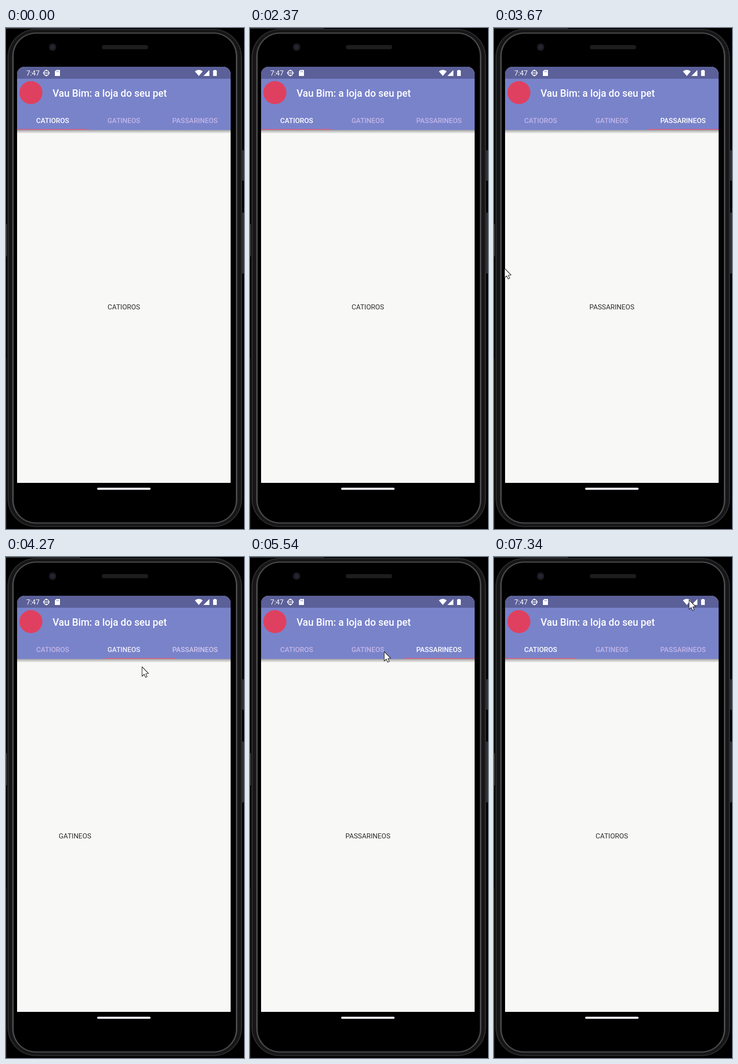
Recreate the animation shown at these times as an HTML page with a canvas. Size 516 by 1086 pixels, loop 7400 ms.

```html
<!DOCTYPE html>
<html lang="pt-BR">
<head>
<meta charset="utf-8">
<title>Tabs</title>
<style>
html, body { margin: 0; width: 100%; height: 100%; overflow: hidden; background: #000; }
canvas { display: block; width: 516px; height: 1086px; }
</style>
</head>
<body>
<canvas id="stage" width="516" height="1086"></canvas>
<script>
const ctx = document.getElementById('stage').getContext('2d');
const LOOP = 7400, SETTLE = 400, GLIDE = 330;
const LEFT = 24, TOP = 84, WIDTH = 463, HEIGHT = 902, TAB = WIDTH / 3;
const TABS = ['CATIOROS', 'GATINEOS', 'PASSARINEOS'];
const WHITE = '#fff', STATUS = '#5b6099', BAR = '#7983ca';

// The pointer glides to (x, y) by `at`; the pages begin to slide at `from`.
const ENTER = { at: 2430, x: 460, y: 521 };
const GESTURES = [
  { at: 2740, x: 110, y: 525, from: 2500, page: 1 },
  { at: 3200, x: 23, y: 521, from: 3135, page: 2 },
  { at: 4270, x: 295, y: 238, from: 3995, page: 1 },
  { at: 4830, x: 400, y: 203, from: 4830, page: 2 },
  { at: 5370, x: 291, y: 205, from: 5540, page: 1.016 },
  { at: 5900, x: 122, y: 188, from: 6240, page: 0 },
  { at: 7340, x: 423, y: 93, from: LOOP, page: 0 }
];

const clamp = v => Math.max(0, Math.min(1, v));
const mix = (a, b, u) => a + (b - a) * u;
const progress = (t, start, span) => {
  const u = clamp((t - start) / span);
  return u * u * (3 - 2 * u);
};

function pageAt(t) {
  return GESTURES.reduce((p, g) => mix(p, g.page, progress(t, g.from, SETTLE)), 0);
}

function pointerAt(t) {
  return GESTURES.reduce((p, g) => {
    const u = progress(t, g.at - GLIDE, GLIDE);
    return { x: mix(p.x, g.x, u), y: mix(p.y, g.y, u) };
  }, ENTER);
}

function rect(x, y, w, h, color) {
  ctx.fillStyle = color;
  ctx.fillRect(x, y, w, h);
}

function round(x, y, w, h, r, color) {
  ctx.beginPath();
  ctx.roundRect(x, y, w, h, r);
  ctx.fillStyle = color;
  ctx.fill();
}

function circle(x, y, r, color) {
  round(x - r, y - r, 2 * r, 2 * r, r, color);
}

function shape(path, color) {
  ctx.fillStyle = color;
  ctx.fill(new Path2D(path));
}

function text(str, x, y, size, color, weight = 400, align = 'left') {
  ctx.font = `${weight} ${size}px Roboto, sans-serif`;
  ctx.textAlign = align;
  ctx.fillStyle = color;
  ctx.fillText(str, x, y);
}

// Concentric rings: a faint outer edge and a bright inner highlight.
function drawRim() {
  const bump = (i, at, spread) => Math.exp(-(((i - at) / spread) ** 2));
  for (let i = 0; i < 14; i++) {
    const x = 3 + i, y = 2 + i * .75;
    const v = 22 + 28 * bump(i, 1, 1.2) + 68 * bump(i, 11.5, 1.4);
    round(x, y, 515 - 2 * x, 1084 - 2 * y, 62 - i, `rgb(${v},${v},${v * 1.06})`);
  }
  round(17, 12.5, 481, 1059, 48, '#000');
}

function drawPhone() {
  rect(0, 0, 516, 1086, '#000');
  rect(0, 0, 160, 1.5, '#3c3c3c');
  rect(512, 265, 4, 66, '#333');
  rect(512, 400, 4, 132, '#333');
  rect(0, 425, 2, 70, '#3a3a38');
  rect(0, 716, 1, 370, '#2b2b2b');
  drawRim();
  circle(101, 41.5, 8, '#1c1c20');
  circle(101, 41.5, 4, '#25263c');
  round(208, 37, 100, 9, 4, '#1d1d1d');
  round(197.5, 996.5, 116, 4.5, 2.2, '#f4effa');
}

function drawStatus() {
  rect(LEFT, TOP, WIDTH, 26, STATUS);
  text('7:47', 44, 102.5, 15, WHITE);
  ctx.strokeStyle = WHITE;
  ctx.lineWidth = 1.6;
  ctx.stroke(new Path2D('M82 97.5a5.5 5.5 0 1 0 11 0a5.5 5.5 0 1 0-11 0M80 97.5h15M87.5 90v4M87.5 101v4'));
  shape('M109 91h8v13h-11v-10z', WHITE);
  rect(110, 93, 1, 3, STATUS);
  rect(113, 93, 1, 3, STATUS);
  shape('M418 104L409.5 94Q418 87.5 426.5 94z', WHITE);
  shape('M441 91v13h-13z', WHITE);
  shape('M451 91h4v1h2v12h-8v-12h2z', WHITE);
}

function drawScreen(page) {
  ctx.save();
  ctx.beginPath();
  ctx.roundRect(LEFT, TOP, WIDTH, HEIGHT, [16, 16, 0, 0]);
  ctx.clip();
  rect(LEFT, TOP, WIDTH, HEIGHT, '#f8f8f7');

  const shade = ctx.createLinearGradient(0, 221, 0, 229);
  shade.addColorStop(0, 'rgba(0,0,0,.34)');
  shade.addColorStop(1, 'rgba(0,0,0,0)');
  rect(LEFT, 221, WIDTH, 8, shade);
  rect(LEFT, 110, WIDTH, 111, BAR);
  drawStatus();
  circle(54, 140, 25, '#e0405f');
  text('Vau Bim: a loja do seu pet', 101, 148.5, 21.4, WHITE, 500);

  TABS.forEach((name, i) => {
    const on = clamp(1 - Math.abs(i - page));
    const color = `rgb(${mix(194, 255, on)},${mix(181, 255, on)},${mix(232, 255, on)})`;
    text(name, LEFT + TAB * (i + .5), 206, 15, color, 500, 'center');
    text(name, LEFT + WIDTH * (i - page + .5), 609.5, 15, '#2c2c2c', 400, 'center');
  });
  rect(LEFT + TAB * page, 219, TAB, 2, '#cf6283');
  ctx.restore();
}

function drawPointer({ x, y }) {
  const arrow = new Path2D('M0 0V20.5L4.6 16.3L7.6 23L11 21.5L8 15L14 14.5z');
  ctx.save();
  ctx.translate(x, y);
  ctx.fillStyle = WHITE;
  ctx.fill(arrow);
  ctx.strokeStyle = '#222';
  ctx.lineWidth = 1.2;
  ctx.lineJoin = 'round';
  ctx.stroke(arrow);
  ctx.restore();
}

function frame() {
  const t = performance.now() % LOOP;
  drawPhone();
  drawScreen(pageAt(t));
  if (t >= ENTER.at) drawPointer(pointerAt(t));
  requestAnimationFrame(frame);
}
frame();
</script>
</body>
</html>
```
